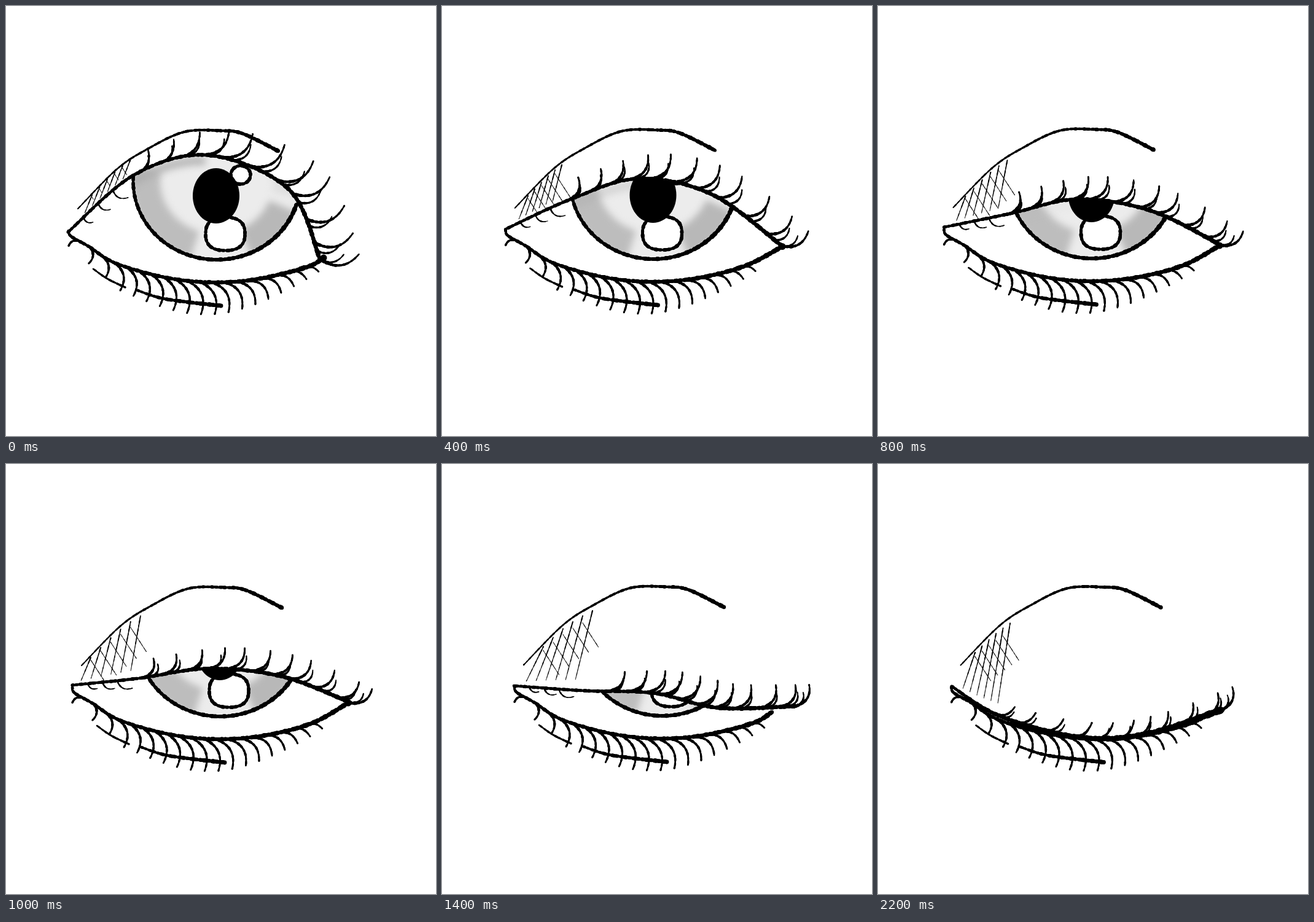
Animation of 700x700 px, one loop 2400 ms. Source, as an HTML page with a canvas:

```html
<!DOCTYPE html>
<html>
<head>
<meta charset="utf-8">
<style>
  html, body { margin: 0; width: 100%; height: 100%; overflow: hidden; background: #fff; }
  canvas { display: block; }
</style>
</head>
<body>
<canvas id="stage" width="700" height="700"></canvas>
<script>
const ctx = document.getElementById('stage').getContext('2d');
const LOOP = 2400;
const RAD = Math.PI / 180;

const mix = (a, b, f) => a + (b - a) * f;
const mixAll = (a, b, f) => Array.isArray(a) ? a.map((v, i) => mixAll(v, b[i], f)) : mix(a, b, f);
const points = (text) => text.split(',').map((pair) => pair.trim().split(' ').map(Number));
const jitter = (seed) => Math.sin(seed * 12.9898 + 4);

// Each pose: shift of the eye, outer end of the lower lid, hatch (first x, last x, lean),
// lashes (first x, inner and outer angle, inner and outer length), upper lid
const poses = [
  [[0, 0], [517, 410], [128, 190, 12], [206, 66, 3, 46, 72], points('101 368, 210 274, 330 243, 460 298, 511 412')],
  [[-2, 0], [553, 392], [117, 172, 16], [206, 68, 25, 40, 60], points('99 367, 207 301, 320 266, 440 293, 553 392')],
  [[5, -2], [555, 391], [133, 188, 14], [206, 76, 27, 42, 50], points('107 360, 215 327, 320 296, 440 321, 555 390')],
  [[6, -2], [557, 389], [122, 203, 16], [222, 68, 30, 36, 46], points('108 360, 215 349, 330 333, 450 346, 562 389')],
  [[16, -3], [537, 404], [137, 217, 28], [264, 52, 54, 44, 46], points('117 361, 230 369, 345 373, 450 397, 576 394')],
  [[16, -3], [537, 404], [152, 207, -20], [208, 52, 68, 42, 42], points('117 362, 220 387, 340 400, 460 405, 576 401')],
  [[17.5, -2.5], [540, 404], [138, 195, 20], [185, 20, 62, 38, 46], points('120 362, 200 411, 330 445, 440 439, 560 400')],
];

const crease = spline(points('117 330, 180 266, 230 233, 290 205, 350 203, 386 208, 443 236'));
const lowerKnots = points('102 366, 106 375, 134 391, 184 421, 284 446, 384 448, 484 427');
const underCreases = ['142 428, 165 444, 194 458', '214 463, 260 477, 350 488'].map((text) => spline(points(text)));
const iris = oval(343, 285, 136, 128, 185, 17);
const glint = oval(357, 371, 32, 27, 0, 360, 0.8);
const spark = oval(382, 275, 16, 15);
const pupil = oval(342, 309, 38, 45);

function spline(p) {
  const out = [], n = p.length - 1;
  for (let i = 0; i < n; i++) {
    const [a, b, c, d] = [p[Math.max(i - 1, 0)], p[i], p[i + 1], p[Math.min(i + 2, n)]];
    for (let t = 0; t < 1; t += 1 / 24) {
      out.push([0, 1].map((j) => b[j] + 0.5 * t * (c[j] - a[j] +
        t * (2 * a[j] - 5 * b[j] + 4 * c[j] - d[j] + t * (3 * (b[j] - c[j]) + d[j] - a[j])))));
    }
  }
  return [...out, p[n]];
}

// Arc in degrees; a power below 1 makes it squarer
function oval(x, y, rx, ry, from = 0, to = 360, power = 1) {
  const soft = (v) => Math.sign(v) * Math.abs(v) ** power;
  return Array.from({ length: 61 }, (_, i) => {
    const angle = mix(from, to, i / 60) * RAD;
    return [x + rx * soft(Math.cos(angle)), y + ry * soft(Math.sin(angle))];
  });
}

// Height of a left-to-right line at x
function heightAt(line, x) {
  const i = line.findIndex((p) => p[0] >= x);
  if (i < 1) return line[i < 0 ? line.length - 1 : 0][1];
  const [a, b] = [line[i - 1], line[i]];
  return mix(a[1], b[1], (x - a[0]) / (b[0] - a[0]));
}

function dot(x, y, r) {
  ctx.beginPath();
  ctx.arc(x, y, r, 0, 7);
  ctx.fill();
}

// Brush line with a slightly uneven edge
function ink(line, from, to = from) {
  ctx.fillStyle = '#000';
  const seed = line[0][0];
  let walked = 0;
  for (let i = 1; i < line.length; i++) {
    const [a, b] = [line[i - 1], line[i]];
    const length = Math.hypot(b[0] - a[0], b[1] - a[1]);
    const steps = Math.max(1, Math.ceil(length));
    for (let s = 0; s < steps; s++) {
      const f = s / steps, d = walked + f * length;
      const rough = 1 + 0.1 * Math.sin(d * 0.9 + seed) + 0.1 * Math.sin(d * 0.37 + seed * 2);
      dot(mix(a[0], b[0], f), mix(a[1], b[1], f),
        mix(from, to, (i - 1 + f) / (line.length - 1)) / 2 * rough);
    }
    walked += length;
  }
}

// Curved hair; heading in degrees, 90 is up
function lash([x, y], heading, length, bend, from, to) {
  const dx = length * Math.cos(heading * RAD), dy = -length * Math.sin(heading * RAD);
  ink(Array.from({ length: 17 }, (_, i) => {
    const t = i / 16, sag = 2 * t * (1 - t) * bend;
    return [x + dx * t - dy * sag, y + dy * t + dx * sag];
  }), from, to);
}

function trace(line) {
  ctx.beginPath();
  line.forEach((p) => ctx.lineTo(...p));
}

function drawShade(lid, shift, k) {
  ctx.save();
  trace([...iris, [479, 235], [207, 235]]);
  ctx.clip();
  ctx.fillStyle = '#ececec';
  ctx.fillRect(200, 230, 290, 190);
  ctx.filter = 'blur(6px)';
  ctx.lineWidth = 48;
  for (const [from, to, color] of [[108, 190, '#bdbdbd'], [22, 66, '#b8b8b8'], [-45, 12, '#dedede']]) {
    trace(oval(343, 285, 116, 110, from, to));
    ctx.strokeStyle = color;
    ctx.stroke();
  }
  // Shadow under the lid fades as it lowers
  ctx.lineWidth = 14;
  ctx.strokeStyle = `rgba(170,170,170,${Math.max(0, 0.8 - k * 0.3)})`;
  trace(lid.filter((p) => p[0] > 205 && p[0] < 325).map(([x, y]) => [x - shift[0], y - shift[1] + 10]));
  ctx.stroke();
  ctx.restore();
}

function drawIris(lid, shift, k) {
  ctx.save();
  trace([...lid, [lid[lid.length - 1][0], 600], [lid[0][0], 600]]);
  ctx.clip();
  ctx.translate(...shift);
  drawShade(lid, shift, k);
  for (const shape of [spark, glint]) {
    ctx.fillStyle = '#fff';
    trace(shape);
    ctx.fill();
    ink(shape, 5);
  }
  ink(iris, 5, 6.5);
  trace(pupil);
  ctx.fill();
  ctx.restore();
}

function drawHatch(lid, fold, [first, last, lean]) {
  for (let i = 0; i < 6; i++) {
    const x = mix(first, last, i / 5), top = x + lean;
    const high = heightAt(fold, top), low = heightAt(lid, x);
    ink([[top, mix(high, low, 0.06)], [x, mix(high, low, 0.88)]], 2, 1.3);
    const y = mix(high, low, 0.15);
    const f = Math.min(1, (heightAt(lid, top + 13) - 3 - y) / 40);
    if (i < 5 && f > 0) ink([[top, y], [top + 26 * f, y + 40 * f]], 1.3);
  }
}

function drawUpperLashes(lid, [firstX, inner, outer, short, long]) {
  const first = lid.findIndex((p) => p[0] >= firstX), pairs = 11;
  const root = (u) => lid[Math.round(mix(first, lid.length - 1, Math.min(1, u)))];
  for (let i = 0; i < pairs; i++) {
    const u = i / (pairs - 1);
    const heading = mix(inner, outer, u) + 5 * jitter(i);
    const length = mix(short, long, u) * (1 + 0.12 * jitter(i + 20));
    lash(root(u), heading, length, 0.45, 5, 2.6);
    lash(root(u + 0.035), heading + 4, length * 0.62, 0.45, 4, 2);
  }
  for (let i = 0; i < 3; i++) {
    const x = lid[0][0] + 25 + i * 24;
    lash([x, heightAt(lid, x)], -25, 18 + i * 5, 0.5, 2.6, 1.5);
  }
}

// Short hairs at the inner corner, then hanging, then sweeping outwards
function drawLowerLashes(line) {
  const count = 19;
  for (let i = 0; i < count; i++) {
    const u = i / (count - 1), x = mix(117, 474, u);
    const swing = 12 + 73 * u ** 3 - 70 * Math.exp(-u * 25);
    const length = (20 + 33 * Math.min(1, u * 6) - 13 * u ** 4) * (1 + 0.14 * jitter(i));
    lash([x, heightAt(line, x)], swing - 90, length, i ? -0.45 : 0.4, 4.4, 2.8);
  }
}

function draw(k) {
  const [shift, tail, hatch, lashes, knots] = mixAll(poses[Math.floor(k)], poses[Math.ceil(k)], k % 1);
  const lid = spline(knots);
  const fold = crease.map(([x, y]) => [x + shift[0], y + shift[1]]);
  const lower = spline([...lowerKnots, [tail[0] - shift[0], tail[1] - shift[1]]]);

  ctx.fillStyle = '#fff';
  ctx.fillRect(0, 0, 700, 700);
  drawIris(lid, shift, k);
  drawHatch(lid, fold, hatch);
  ink(fold, 2, 6);

  ctx.save();
  ctx.translate(...shift);
  ink(lower, 4, 7);
  underCreases.forEach((line, i) => ink(line, 2.5 + i, 3.5 + i * 3));
  drawLowerLashes(lower);
  ctx.restore();

  ink(lid, 4.5, 6.5 + Math.max(0, k - 5) * 4);
  if (k < 3.5) dot(...tail, 5.5);
  drawUpperLashes(lid, lashes);
}

let shown = -1;
function tick() {
  const t = performance.now() % LOOP;
  const step = t < 200 ? Math.floor(t / 100) : 1 + Math.floor(t / 200);
  if (step !== shown) draw((shown = step) / 2);
  requestAnimationFrame(tick);
}
tick();
</script>
</body>
</html>
```
